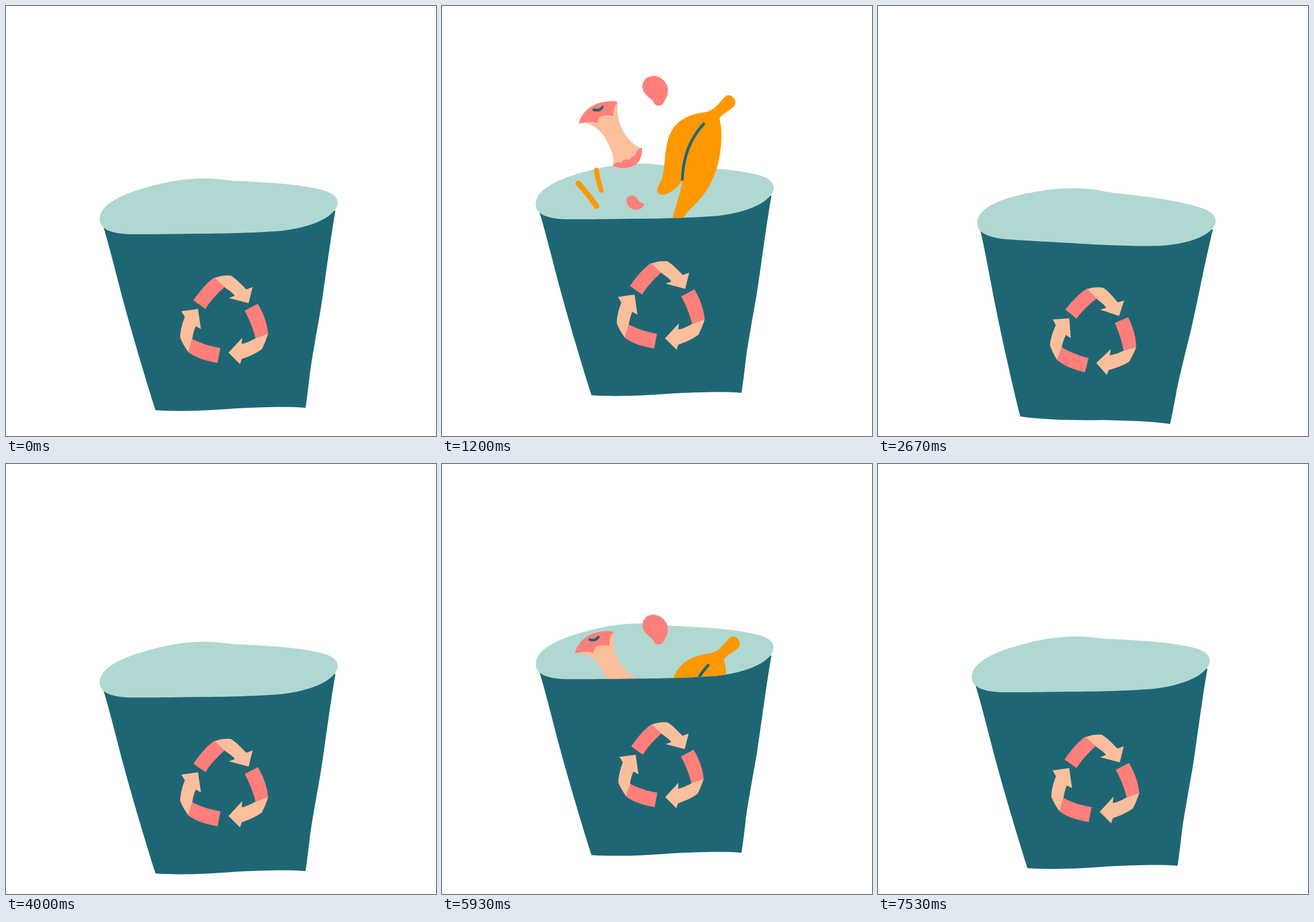
Write an HTML page with a canvas that moves like this. It is 748x748 px and loops after 7.61 s.

```html
<!DOCTYPE html>
<html lang="en">
<head>
<meta charset="utf-8">
<title>Compost bin</title>
<style>
  html, body { margin: 0; width: 100%; height: 100%; overflow: hidden; background: #fff; }
  canvas { display: block; }
</style>
</head>
<body>
<canvas id="stage" width="748" height="748"></canvas>
<script>
const ctx = document.getElementById('stage').getContext('2d');
const CYCLE = 3805;
const TEAL = '#1f6675', MINT = '#b0d8d3', PINK = '#ff7f7b', PEACH = '#fbbf9c', ORANGE = '#ff9800';

const FRONT = 'C577,359 548,383 480,391 C430,395 370,396 330,396 C280,397 240,397 215,397 C185,396 163,389 163,371';
const rim = new Path2D('M163,371 C163,343 207,326 246,315 C282,305 313,300 346,300 C372,300 384,304 408,304.5 C456,307 498,309 537,317 C564,322 577,330 577,342 ' + FRONT + 'Z');
const body = new Path2D('M169,383 L330,350 L573,356 C562,420 555,480 547,530 C540,570 530,625 528,645 Q524,680 521,699 C490,696 440,698 400,700 C350,704 300,706 260,703 C240,640 218,565 204,513 C190,460 179,415 169,383Z');
// everything above the front lip of the bin
const opening = new Path2D('M-300,371 V-700 H1000 V342 H577 ' + FRONT + 'Z');

const fill = (color, d) => ({ color, path: new Path2D(d) });
const line = (color, width, d) => ({ color, width, path: new Path2D(d) });

const arrows = [
  fill(PINK, 'M326,512 C337,496 350,480 363,472 L380,489 C368,500 355,513 347,527Z'),
  fill(PEACH, 'M363,473 C372,469 382,468 391,469 C401,475 409,484 418,493 L429,489 L422,517 L388,508 L398,504 C393,497 386,494 380,489Z'),
  fill(PINK, 'M415,530 L438,518 C447,533 454,550 456,570 L434,578 C430,562 424,546 415,530Z'),
  fill(PEACH, 'M456,570 C453,580 449,589 445,597 C434,605 422,610 410,614 L407,623 L387,603 L411,577 L410,588 C419,586 427,582 434,578Z'),
  fill(PINK, 'M324,579 C339,587 356,592 373,595 L368,621 C349,617 331,613 317,602Z'),
  fill(PEACH, 'M317,602 C311,593 306,585 303,577 C303,564 307,551 311,541 L305,531 L334,527 L339,562 L330,557 C327,564 325,571 324,579Z')
];

// drift: sideways travel in px per second, lift: share of the common throw
const scraps = [
  { drift: -47, lift: 1, parts: [line(ORANGE, 9.5, 'M237,309 Q253,326 269,349')] },
  { drift: -27, lift: 1, parts: [line(ORANGE, 8.5, 'M268.5,286 Q271,304 277,321')] },
  { drift: -10, lift: 1, parts: [
    fill(PINK, 'M321,340 C320,331 330,328 336,332 C341,336 340,341 351,344 C353,350 345,355 337,355 C328,354 322,348 321,340Z')] },
  { drift: 8.6, lift: 1.03, parts: [
    fill(ORANGE, 'M493,158 C500,152 512,160 510,171 C508,179 490,186 483,195 C482,200 486,205 486,220 C487,275 470,318 436,350 C424,360 418,372 411,388 C407,394 399,393 399,386 C401,358 413,338 418,304 C409,318 396,327 384,329 C374,329 372,322 377,313 C390,290 385,265 392,238 C399,205 422,191 452,186 C475,184 480,170 493,158Z'),
    line(TEAL, 5, 'M455,206 C440,222 420,250 418,302')] },
  { drift: -7.6, lift: 0.89, parts: [
    fill(PEACH, 'M240,204 C262,202 280,220 288,238 C298,256 300,268 297,278 C310,285 340,275 348,248 C330,243 315,222 309,205 C305,190 304,180 306,169Z'),
    fill(PINK, 'M238,205 C243,185 262,165 300,166 L306,168 C300,172 299,180 298,192 C290,190 280,190 274,194 C272,198 271,200 270,204 C262,201 250,202 238,205Z'),
    fill(PINK, 'M297,278 C310,286 338,284 345,266 C348,258 348,252 348,247 C342,249 338,252 336,261 Q329,262 326,268 Q317,265 312,273 Q304,271 297,278Z'),
    line(TEAL, 4.5, 'M264,181 Q274,184 279,176.5')] },
  { drift: 0, lift: 1, parts: [
    fill(PINK, 'M366,122 C378,121 393,133 393,146 C393,158 387,166 384,171 C381,175 373,175 370,171 C366,163 361,161 355,155 C347,147 347,137 352,130 C355,125 360,123 366,122Z')] }
];

// tracks of [time, value], eased between keys
const binY = [[0, 0], [450, 23], [1000, -26], [2050, -26], [2545, 24], [3000, -4], [3250, 0], [CYCLE, 0]];
const binTilt = [[0, 0], [2380, 0], [2850, 5.6], [3080, -3.4], [3240, 1.3], [3400, 0], [CYCLE, 0]];
const logoX = [[0, 0], [1200, 1], [2125, 1.5], [2670, -1], [3300, 0], [3700, -1.7], [CYCLE, 0]];
const logoY = [[0, 0], [1200, 1], [2125, 1], [2670, -0.5], [3300, 0], [3700, 2.4], [CYCLE, 0]];
const logoSize = [[0, 1], [1400, 1], [2125, 0.97], [2670, 0.98], [3300, 1], [CYCLE, 1]];

function at(track, t) {
  const i = Math.max(1, track.findIndex(k => k[0] >= t));
  const [t0, a] = track[i - 1], [t1, b] = track[i];
  const u = (t - t0) / (t1 - t0);
  return a + (b - a) * u * u * (3 - 2 * u);
}

// height of the thrown scraps relative to their drawn place
function toss(t) {
  const d = t - 1580;
  return d * d * (d < 0 ? 0.000713 : 0.000815) - 103;
}

function paint(parts) {
  for (const { color, width, path } of parts) {
    if (width) {
      ctx.strokeStyle = color;
      ctx.lineWidth = width;
      ctx.stroke(path);
    } else {
      ctx.fillStyle = color;
      ctx.fill(path);
    }
  }
}

function placeBin(t) {
  const tilt = at(binTilt, t);
  ctx.translate(370 - 0.3 * tilt, 525 + at(binY, t));
  ctx.rotate(tilt * Math.PI / 180);
  ctx.translate(-370, -525);
}

function draw(t) {
  ctx.setTransform(1, 0, 0, 1, 0, 0);
  ctx.fillStyle = '#fff';
  ctx.fillRect(0, 0, 748, 748);
  ctx.lineCap = 'round';

  ctx.save();
  placeBin(t);
  paint([{ color: TEAL, path: body }, { color: MINT, path: rim }]);
  const size = at(logoSize, t);
  ctx.save();
  ctx.translate(380 + at(logoX, t), 546 + at(logoY, t));
  ctx.scale(size, size);
  ctx.translate(-380, -546);
  paint(arrows);
  ctx.restore();

  if (t > 850 && t < 2400) {
    ctx.clip(opening);
    const y = toss(t);
    for (const { drift, lift, parts } of scraps) {
      ctx.setTransform(1, 0, 0, 1, drift * (t - 1200) / 1000, y * lift);
      paint(parts);
    }
  }
  ctx.restore();
}

const start = performance.now();
function tick() {
  draw((performance.now() - start) % CYCLE);
  requestAnimationFrame(tick);
}
tick();
</script>
</body>
</html>
```
